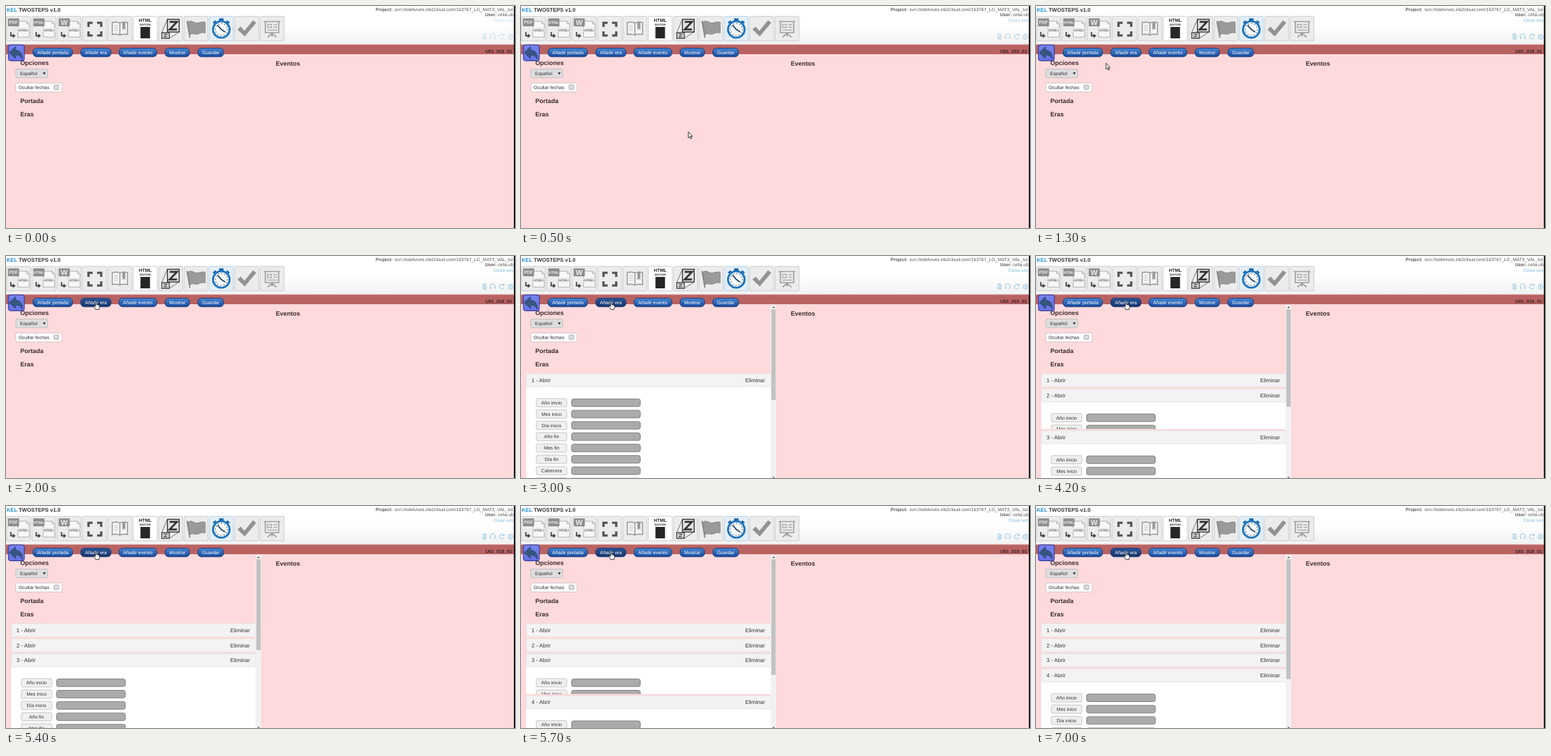
Recreate the animation shown at these times as an HTML page. Size 800 by 350 pixels, loop 7100 ms.

```html
<!DOCTYPE html>
<html lang="es">
<head>
<meta charset="utf-8">
<title>Editor</title>
<style>
html, body { margin: 0; width: 100%; height: 100%; overflow: hidden; background: #fff; }
svg { display: block; width: 800px; height: 350px; }
text { font-family: "Liberation Sans", Arial, sans-serif; text-rendering: geometricPrecision; white-space: pre; }
</style>
</head>
<body>
<svg id="stage" viewBox="0 0 800 350">
  <defs>
    <linearGradient id="bar" x2="0" y2="1"><stop offset=".5" stop-color="#fff"/><stop offset="1" stop-color="#f1f1f1"/></linearGradient>
    <linearGradient id="blue" x2="0" y2="1"><stop stop-color="#4a86d2"/><stop offset="1" stop-color="#174a9c"/></linearGradient>
    <linearGradient id="dark" x2="0" y2="1"><stop stop-color="#2c5596"/><stop offset="1" stop-color="#14336b"/></linearGradient>
    <linearGradient id="back" x2="0" y2="1"><stop stop-color="#7583f0"/><stop offset="1" stop-color="#6672e4"/></linearGradient>
    <clipPath id="left"><path d="M8 77H401V350H8z"/></clipPath>
  </defs>
  <path fill="#fedadc" d="M0 60H800V350H0z"/>
  <path fill="url(#bar)" d="M0 0H800V61H0z"/>
  <path fill="#b96262" d="M0 61H800V76H0z"/>
  <path fill="#d08484" d="M0 60.4H800V61.4H0z"/>
  <g id="tools"></g>
  <g id="labels"></g>
  <g id="user" fill="none" stroke="#8cbfe0">
    <path d="M749 45h6M751 44h2M750 46v6h4.500v-6M752.200 47v4"/>
    <path d="M762.500 51a4 4 0 1 1 5 0M762 49v3M768 49v3"/>
    <path d="M782.500 46a3.800 3.800 0 1 0 .3 4M783 44v2.500h-2.500"/>
    <circle cx="793" cy="48.500" r="3.800"/><path d="M793 46v4M791.500 48.500l1.500 1.500 1.500-1.500"/>
  </g>

  <g id="list" clip-path="url(#left)">
    <g id="panels"></g>
    <path fill="#f1f1f1" d="M392.500 77H401V350H392.500z"/>
    <rect id="thumb" x="393.500" y="84" width="6.800" fill="#c1c1c1"/>
    <path fill="#505050" d="M395 82l2-2.500 2 2.500zM395 348.500h4l-2 2z"/>
  </g>

  <g id="buttons"></g>
  <rect x="3.800" y="61.300" width="25" height="25" rx="3.500" fill="url(#back)" stroke="#343c9c" stroke-width="1.200"/>
  <path d="M5 73.500L15 64v5.500c7 .3 11.500 5.500 10.500 14.500-2-4.500-5-6.500-10.500-6.500V83z" fill="#36567f" stroke="#26406a" stroke-width=".7"/>

  <path fill="#000" d="M798.300 0H800V350H798.300z"/>
  <path id="arrow" d="M0 0v9.500l2.200-2 1.600 3.500 1.500-.7-1.600-3.300h2.900z" fill="#fff" stroke="#111" stroke-width=".9"/>
  <path id="hand" d="M-.2-1.500c0-1.400 1.900-1.400 1.900 0v3.300c2 .1 4.400.6 4.400 2.200 0 2-.6 3-1 5.300h-5C-.6 7.300-2 6-2.700 4.500c-.5-1.200 1-1.700 1.700-.7l.8.8z" fill="#fff" stroke="#111" stroke-width=".9"/>
</svg>
<script>
const LOOP = 7100, STEP = 100, SLIDE = 400, BODY = 290, PITCH = 23.7;
const $ = id => document.getElementById(id);
const text = (x, y, s, size, attrs = '') =>
  `<text x="${x}" y="${y}" font-size="${size}" ${attrs}>${s}</text>`;
const box = (x, y, w, h, r, fill, stroke = 'none') =>
  `<rect x="${x}" y="${y}" width="${w}" height="${h}" rx="${r}" fill="${fill}" stroke="${stroke}"/>`;
const MID = 'text-anchor="middle" ', BOLD = 'font-weight="bold" ';

// Toolbar icons, each in its own 38 x 39 cell
const doc = name => `
  <path d="M18 8h14l4 4v21H18z" fill="#f7f7f7" stroke="#aaa"/>
  <path d="M32 8v4h4" fill="none" stroke="#aaa"/>
  ${box(2.5, 3.5, 17.5, 12.5, 1, '#8d8d8d')}
  ${text(11.2, name.length > 1 ? 12.3 : 14, name, name.length > 3 ? 5.8 : name.length > 1 ? 7 : 11.5, MID + BOLD + 'fill="#eee"')}
  ${box(17, 18.5, 19.5, 6.5, 1, '#e8e8e8')}
  ${text(26.8, 23.8, '&lt;HTML&gt;', 4.8, MID + BOLD + 'fill="#777"')}
  <path d="M7 25v6h4" fill="none" stroke="#444" stroke-width="2"/><path d="M10 27.5l4.500 3.500-4.500 3.500z" fill="#444"/>`;

const icons = [
  doc('PDF'), doc('HTML'), doc('W'),
  `<path d="M9.500 17v-6.500H16M23 10.500h6.500V17M29.500 24v6.500H23M16 30.500H9.500V24" fill="none" stroke="#555" stroke-width="3.600"/>`,
  `<path d="M7 10c5-1 9-1 12 1 3-2 7-2 12-1v19c-5-1-9-1-12 1-3-2-7-2-12-1zM19 11v19" fill="#f4f4f4" stroke="#999" stroke-width="1.600"/>
   <path d="M10 15h6M10 18.500h6M10 22h6" stroke="#bbb"/><path d="M23 9.500h4.500V22l-2.200-2.500L23 22z" fill="#999"/>`,
  text(19, 9.2, 'HTML', 7.3, MID + BOLD + 'fill="#222"') + text(19, 14.6, 'EDITOR', 4.6, MID + BOLD + 'fill="#333"') +
    box(11.5, 17, 15, 18, 0, '#262626'),
  `<path d="M5 26L14 5M17 35l15-10" stroke="#666"/>
   <path d="M14 5h18.500v20H14z" fill="#e2e2e2" stroke="#333" stroke-width="1.500"/>
   <path d="M17.500 9H29L17.500 21H29" fill="none" stroke="#333" stroke-width="3"/>
   <path d="M5 26h12v9H5z" fill="#ccc" stroke="#444" stroke-width="1.300"/><path d="M8.500 28.500h5l-5 4h5" fill="none" stroke="#444"/>`,
  `<path d="M4 8l2-1 4.500 27h-2z" fill="#888"/><path d="M6.500 9.500c6-5 10 3 16 1 4-1 7-2 11-1v17c-7-2-9 2-14 2-4 0-6-2-10 1z" fill="#9a9a9a" stroke="#878787"/>`,
  `<path d="M15.500 3.500h7v4h-7zM28.500 6.500l4 3.500-2 2-4-3.500zM9.500 6.500L5.500 10l2 2 4-3.500z" fill="#1b67a9"/>
   <circle cx="19" cy="21" r="13" fill="#f4faff" stroke="#1f75bd" stroke-width="3.200"/>
   <circle cx="19" cy="21" r="9.500" fill="none" stroke="#333" stroke-width="1.800" stroke-dasharray="1 3.974"/>
   <path d="M13 14l6 7 6 4" fill="none" stroke="#1d3d5c" stroke-width="1.800"/>`,
  `<path d="M4.500 21l5-4.500 6 6.500L29 6.500l5 4L16 32z" fill="#929292"/>`,
  `<path d="M6 8.500h26M8.500 9v17h21V9M19 26v6M12 33l7-6 7 6" fill="none" stroke="#999" stroke-width="1.700"/>
   <path d="M12 13h6v5h-6zM21 13.500h6M21 17.500h6M12 22h15" fill="none" stroke="#aaa" stroke-width="1.400"/>`
];
$('tools').innerHTML = icons.map((icon, i) => {
  const fill = i === 5 ? '#fff' : i === 8 ? '#e4eef6' : '#ececec';
  return `<g transform="translate(${0.6 + 39.85 * i} 16)">${box(0.3, 0.3, 37.6, 38.6, 1, fill, i === 8 ? '#b5cfe2' : '#c9c9c9')}${icon}</g>`;
}).join('');

const head = (x, y, s) => text(x, y, s, 9.8, BOLD + 'fill="#3b2a2c"');
const grey = 'fill="#555"';
$('labels').innerHTML =
  text(1, 9, '<tspan fill="#1c8fd0">KEL</tspan> TWOSTEPS v1.0', 8.4, BOLD + 'fill="#333"') +
  text(581, 8, 'Project:', 7.1, BOLD + grey) +
  text(610.5, 8, 'svn://edelvives.ink2cloud.com/163767_LG_MAT3_VAL_tut', 7.2, grey) +
  text(753, 16, 'User:', 7.1, BOLD + grey) + text(773, 16, 'celia.ub', 7.2, grey) +
  text(753.5, 73.6, 'U01_018_01', 7.3, BOLD + 'fill="#3c2222"') +
  head(22.5, 93.3, 'Opciones') + head(22.5, 153.3, 'Portada') + head(22.5, 174.4, 'Eras') + head(424, 94.3, 'Eventos') +
  box(15.5, 99.5, 50, 13.5, 1.5, '#dedede', '#bdbdbd') + text(22, 108.8, 'Español', 7.5, 'fill="#333"') +
  '<path d="M58 104.800h4.400l-2.200 3.400z" fill="#222"/>' +
  box(15.5, 121.5, 72.5, 14, 1.5, '#fff', '#d2c4c5') + text(19.7, 130.9, 'Ocultar fechas', 7.5, 'fill="#333"') +
  box(75.5, 124.5, 7.5, 7, 1, '#dcdcdc', '#aaa');
$('user').innerHTML += text(766, 24.5, 'Close ses', 7.2, 'fill="#7db8dc" stroke="none"');

const spans = [[42.5, 104.5], [117.5, 165], [177.5, 237], [250, 288.5], [301.5, 342]];
const names = ['Añadir portada', 'Añadir era', 'Añadir evento', 'Mostrar', 'Guardar'];
$('buttons').innerHTML = spans.map(([a, b], i) =>
  box(a, 66.5, b - a, 13.5, 5.5, 'url(#blue)', '#173a78') +
  text((a + b) / 2, 75.8, names[i], 7.5, MID + 'fill="#fff"')).join('');
const faces = [...$('buttons').querySelectorAll('rect')];

const fields = ['Año inicio', 'Mes inico', 'Día inicio', 'Año fin', 'Mes fin', 'Día fin', 'Cabecera', 'Texto'];
const rows = fields.map((name, i) => {
  const y = 46.3 + 17.85 * i;
  return box(24, y - 6.5, 48, 13, 2, '#efefef', '#c4c4c4') + text(48, y + 2.6, name, 7.5, MID + 'fill="#333"') +
    box(79.5, y - 6, 108, 12, 3, '#ababab', '#7c7c7c');
}).join('');
$('panels').innerHTML = [1, 2, 3, 4].map(n =>
  `<g>${box(8, -2.2, 385, 4, 0, '#fedadc')}${box(8.5, 0.5, 384, 300, 1.5, '#fff')}${box(8.5, 0.5, 384, 20.6, 1.5, '#f3f3f3', '#e6e2e2')}
  ${text(16.5, 13.9, n + ' - Abrir', 8.6, 'fill="#333"')}${text(383.5, 13.9, 'Eliminar', 8.6, 'text-anchor="end" fill="#333"')}${rows}</g>`).join('');
const panels = [...$('panels').children];

// Time of each new era, and the scroll thumb height it leads to
const adds = [[2100, 143], [3000, 216], [3900, 143], [5400, 189]];
// Cursor: time, x, y
const path = [[100, 330, 255], [900, 196, 142], [1300, 110, 90], [1400, 98, 80], [1500, 100, 77], [1600, 126, 75], [1700, 141, 75]];

const clamp = v => Math.min(1, Math.max(0, v));
const swing = p => 0.5 - Math.cos(Math.PI * clamp(p)) / 2;

function cursorAt(t) {
  const i = path.findIndex(k => k[0] > t);
  if (i < 0) return path[path.length - 1].slice(1);
  const [t0, x0, y0] = path[Math.max(0, i - 1)], [t1, x1, y1] = path[i];
  const p = clamp((t - t0) / (t1 - t0 || 1));
  return [x0 + (x1 - x0) * p, y0 + (y1 - y0) * p];
}

function draw(t) {
  let thumb = adds[0][1];
  adds.forEach(([start, size], i) => {
    const p = i ? swing((t - start) / SLIDE) : 1;
    thumb += (size - thumb) * p;
    panels[i].setAttribute('transform', `translate(0 ${185 + PITCH * i + BODY * (1 - p)})`);
  });
  $('thumb').setAttribute('height', thumb);
  $('list').style.display = t < adds[0][0] ? 'none' : '';
  $('user').style.opacity = 0.5 + 0.5 * clamp(t / 800);

  const [x, y] = cursorAt(t), shown = t >= path[0][0];
  const over = shown && y > 66 && y < 81 ? spans.findIndex(([a, b]) => x > a && x < b) : -1;
  faces.forEach((f, i) => f.setAttribute('fill', i === over ? 'url(#dark)' : 'url(#blue)'));
  for (const id of ['arrow', 'hand']) {
    $(id).setAttribute('transform', `translate(${x} ${y})`);
    $(id).style.display = shown && (id === 'hand') === (over >= 0) ? '' : 'none';
  }
}

const origin = performance.now();
function tick(now) {
  const t = Math.max(0, now - origin) % LOOP;
  draw(Math.floor(t / STEP) * STEP);
  requestAnimationFrame(tick);
}
draw(0);
requestAnimationFrame(tick);
</script>
</body>
</html>
```
